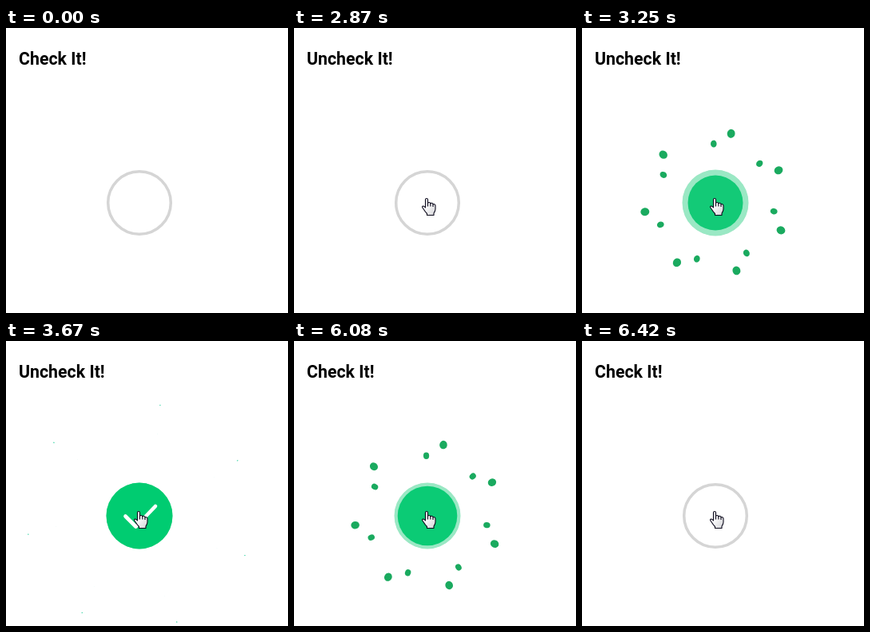
An HTML page for the animation above (8000 ms loop, 353 px wide and 357 px high).

```html
<!DOCTYPE html>
<html lang="en">
<head>
<meta charset="utf-8">
<title>Check It!</title>
<style>
  html, body { margin: 0; width: 100%; height: 100%; overflow: hidden; background: #fff; }
  svg { display: block; width: 100%; height: 100%; }
  text { font: 700 21.33px Roboto, sans-serif; }
</style>
</head>
<body>
<svg viewBox="0 0 353 357">
  <defs>
    <linearGradient id="skin" x1="0" y1="0" x2="1" y2="1">
      <stop offset=".35" stop-color="#fff"/>
      <stop offset="1" stop-color="#d2d2d6"/>
    </linearGradient>
  </defs>
  <text id="title" x="16" y="46">Check It!</text>
  <g transform="translate(167 219)">
    <circle id="ring" fill="none" stroke="#1aaa5f"/>
    <g id="dots"></g>
    <circle r="39.3" fill="none" stroke="#d5d5d5" stroke-width="3.5"/>
    <circle id="halo" fill="#9ae8c4"/>
    <circle id="disc"/>
    <path id="check" d="M-17.5 .5L-4.5 13.5L20 -12" pathLength="100" fill="none" stroke="#fff"
      stroke-width="4.6" stroke-linecap="round" stroke-linejoin="round"/>
  </g>
  <path id="arrow" d="M.5 .5V16.5L4.2 13L6.8 18.8L9.2 17.7L6.7 12H11.8Z" fill="#fff" stroke="#000"/>
  <g id="hand" transform="translate(160 213)" stroke="#0c0a1c" stroke-width="1.1" stroke-linejoin="round">
    <path fill="url(#skin)" d="M4.5 12V2Q4.5 .5 6 .5T7.5 2V6.8Q7.6 5.4 9.2 5.5T10.8 7Q11.2 6 12.6 6.3T14 8Q14.6 7.2 15.8 7.7T17 9.5V14Q16.8 16.5 15 19V21.5H6.5V19.5Q4 17 2.6 14.5L.7 11.8Q.3 10.3 1.6 10Q2.8 9.9 4.5 12Z"/>
    <path fill="none" d="M7.5 6.8V10.5M10.8 7V10.5M14 8V11"/>
  </g>
</svg>
<script>
const LOOP = 8000, CLICK_ON = 2870, CLICK_OFF = 5722, BURST = 754;
const $ = id => document.getElementById(id);
const set = (el, attrs) => { for (const k in attrs) el.setAttribute(k, attrs[k]); };
const show = (el, on) => set(el, { visibility: on ? 'visible' : 'hidden' });
const clamp = (v, lo, hi) => Math.min(hi, Math.max(lo, v));
const mix = (a, b, p) => a + (b - a) * p;
const part = (t, from, to) => clamp((t - from) / (to - from), 0, 1);
const rgb = (a, b, p) => `rgb(${a.map((v, i) => Math.round(mix(v, b[i], p)))})`;

// Piecewise linear value from [time, value] points.
function track(points, t) {
  if (t <= points[0][0]) return points[0][1];
  for (let i = 1; i < points.length; i++) {
    const [t0, v0] = points[i - 1], [t1, v1] = points[i];
    if (t <= t1) return mix(v0, v1, (t - t0) / (t1 - t0));
  }
  return points[points.length - 1][1];
}

const OUTER = [[62, 0], [130, 62], [200, 83.5], [230, 85.5], [246, 86.5], [370, 95]];
const INNER = [[120, 0], [230, 70], [246, 76.5], [270, 83], [370, 95]];
const BIG = { angle: [-76.4, -79.4], dist: [68, 141], size: 7.2, end: 0.7, aspect: 0.9 };
const SMALL = { angle: [-97.4, -77.5], dist: [61.5, 105], size: 6, end: 0.15, aspect: 0.85 };

const dots = [];
for (let i = 0; i < 7; i++) {
  for (const kind of [BIG, SMALL]) {
    const el = document.createElementNS('http://www.w3.org/2000/svg', 'ellipse');
    $('dots').append(el);
    dots.push({ el, kind, turn: i * 50 });
  }
}

function drawDots(u) {
  const p = (u - 230) / (BURST - 230);
  const fill = rgb([26, 170, 95], [22, 205, 150], part(u, 550, BURST));
  show($('dots'), u > 150);
  for (const { el, kind, turn } of dots) {
    const grow = track([[150, 0], [230, 0.9], [246, 1]], u);
    const rx = grow * mix(kind.size, kind.end, part(u, 246, BURST));
    const angle = mix(...kind.angle, Math.max(0, p)) + turn;
    set(el, {
      cx: mix(...kind.dist, p), rx, ry: rx * kind.aspect,
      transform: `rotate(${angle})`, fill
    });
  }
}

function drawBurst(u) {
  const outer = track(OUTER, u), inner = track(INNER, u);
  show($('ring'), outer - inner > 0.05);
  set($('ring'), { r: (outer + inner) / 2, 'stroke-width': Math.max(0, outer - inner) });
  drawDots(u);
  set($('halo'), { r: 41.5 * part(u, 122, 292) });
  set($('disc'), {
    r: track([[185, 0], [230, 8], [246, 11], [420, 41.5]], u),
    fill: rgb([80, 196, 140], [0, 204, 113], part(u, 250, 420))
  });
  const drawn = 100 * part(u, 420, 620);
  show($('check'), drawn > 0);
  set($('check'), { 'stroke-dasharray': `${drawn} 200` });
}

function drawCursor(t) {
  const p = 1 - (1 - part(t, 150, 870)) ** 2;
  show($('arrow'), t >= 190 && t < 1010);
  show($('hand'), t >= 1010);
  set($('arrow'), { transform: `translate(${mix(304, 163, p)} ${mix(357, 213, p)})` });
}

function draw(t) {
  const checked = t >= CLICK_ON && t < CLICK_OFF;
  $('title').textContent = checked ? 'Uncheck It!' : 'Check It!';
  const u = t < CLICK_OFF ? t - CLICK_ON : BURST - (t - CLICK_OFF);
  drawBurst(clamp(u, 0, BURST));
  drawCursor(t);
}

let start;
function tick(now) {
  start ??= now;
  draw((now - start) % LOOP);
  requestAnimationFrame(tick);
}
draw(0);
requestAnimationFrame(tick);
</script>
</body>
</html>
```
